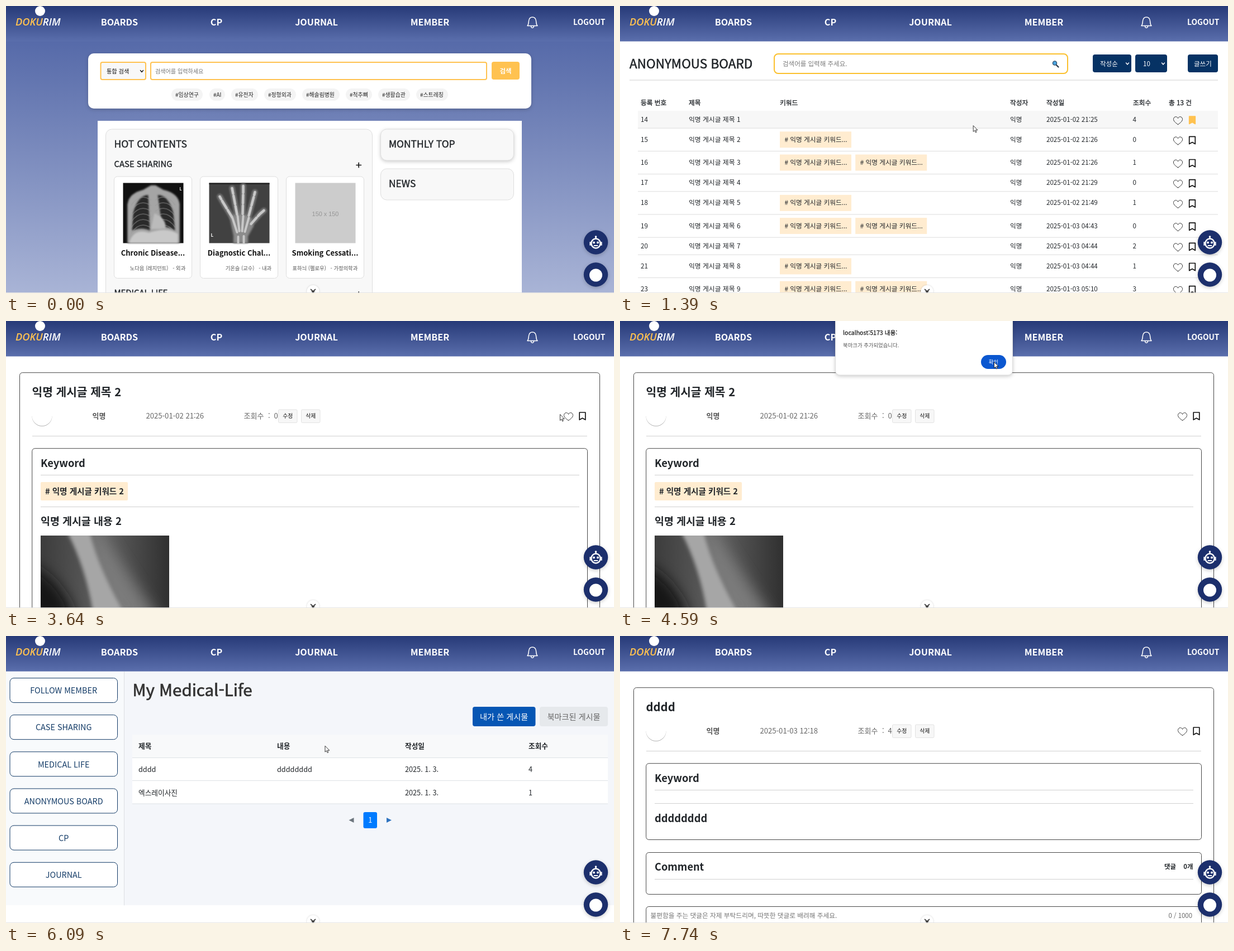
An HTML page for the animation above (8000 ms loop, 1088 by 515 pixels).

```html
<!DOCTYPE html>
<html lang="ko">
<head>
<meta charset="utf-8">
<title>Medical board walkthrough</title>
<style>
html, body { margin: 0; width: 100%; height: 100%; overflow: hidden; background: #fff; }
svg { display: block; width: 1088px; height: 515px; }
text { font-family: "Noto Sans CJK KR", "Noto Sans CJK JP", "Noto Sans CJK", "Noto Sans", sans-serif; fill: currentColor; white-space: pre; }
.m { stroke: currentColor; stroke-width: .025em; }
.b { font-weight: 700; }
.c { text-anchor: middle; }
.e { text-anchor: end; }
.soft { filter: drop-shadow(0 2px 3px rgba(0,0,0,.2)); }
</style>
</head>
<body>
<svg id="stage" viewBox="0 0 1088 515" xmlns="http://www.w3.org/2000/svg"></svg>
<script>
const LOOP = 8000, INK = '#212529', GOLD = '#ffc250', NAVY = '#1c2f6c', CREAM = '#ffecd0';

const text = (x, y, s, size, color = INK, cls = '') =>
  `<text x="${x}" y="${y}" font-size="${size}" class="${cls}" style="color:${color}">${s}</text>`;
// Box given by its left, top, right and bottom edges
const box = (l, t, r, b, fill, line = 'none', radius = 0, more = '') =>
  `<rect x="${l}" y="${t}" width="${r - l}" height="${b - t}" rx="${radius}" fill="${fill}" stroke="${line}" ${more}/>`;
const rule = (l, r, y, color = '#d0d0d0') => `<path d="M${l} ${y}H${r}" stroke="${color}"/>`;
const path = (d, line, width = 1.4, fill = 'none', more = '') =>
  `<path d="${d}" stroke="${line}" stroke-width="${width}" fill="${fill}" stroke-linejoin="round" stroke-linecap="round" ${more}/>`;
const disc = (x, y, r, fill, more = '') => `<circle cx="${x}" cy="${y}" r="${r}" fill="${fill}" ${more}/>`;
const group = (id, body) => `<g id="${id}">${body}</g>`;
const chevron = (x, y, color) => path(`M${x - 2.5} ${y - 1.5}l2.5 3 2.5 -3`, color, 1.4);
const gradient = (id, ...stops) => `<linearGradient id="${id}" x2="0" y2="1">` +
  stops.map(([at, color]) => `<stop offset="${at}" stop-color="${color}"/>`).join('') + '</linearGradient>';

const heart = (x, y) =>
  path(`M${x} ${y + 7}C${x - 6} ${y + 3} ${x - 8.3} ${y} ${x - 8} ${y - 3}C${x - 7} ${y - 8} ${x - 1.5} ${y - 8} ${x} ${y - 4}C${x + 1.5} ${y - 8} ${x + 7} ${y - 8} ${x + 8} ${y - 3}C${x + 8.3} ${y} ${x + 6} ${y + 3} ${x} ${y + 7}Z`, '#333', 1);
const bookmark = (x, y, on) =>
  path(`M${x - 5.3} ${y - 6.5}h10.6v13.3l-5.3 -3 -5.3 3z`, on ? GOLD : '#111', 1.7, on ? GOLD : 'none');

const NAV = [['BOARDS', 203], ['CP', 376.5], ['JOURNAL', 555.5], ['MEMBER', 758.5]];

function header() {
  return box(0, 0, 1088, 63.5, 'url(#bar)') +
    disc(61, 9, 9, '#fff') +
    `<text x="17" y="34.5" font-size="18.3" font-weight="600" font-style="italic" style="font-family:'Open Sans','Noto Sans',sans-serif;color:#fff"><tspan fill="${GOLD}">DOKU</tspan>RIM</text>` +
    NAV.map(([s, x]) => text(x, 34.5, s, 16.2, '#fff', 'b c nav')).join('') +
    path('M933 35.5c2.5-2.5 2-6 2.5-9 .6-4 3-6.5 6.5-6.5s5.9 2.5 6.5 6.5c.5 3 0 6.5 2.5 9zM939.5 36.5c.5 3.5 4.5 3.5 5 0', '#fff', 1.5) +
    text(1072.5, 33.5, 'LOGOUT', 13.8, '#fff', 'b e');
}

function home() {
  const tags = [['임상연구', 296, 352], ['AI', 364, 392], ['유전자', 403, 451], ['정형외과', 462, 519],
    ['해솔림병원', 530, 597], ['척추뼈', 608, 655], ['생활습관', 666, 723], ['스트레칭', 734, 791]];
  const cards = [
    [193.5, 'Chronic Disease...', '노다음 (레지던트)   - 외과', chestScan()],
    [347.5, 'Diagnostic Chal...', '기온슬 (교수)   - 내과', handScan()],
    [501.5, 'Smoking Cessati...', '표하늬 (펠로우)   - 가정의학과',
      box(16, 11.5, 124, 119.5, '#ccc') + `<text x="70" y="70.5" font-size="10.9" class="c" style="font-family:'Liberation Sans',Arial,sans-serif;color:#969696">150 x 150</text>`]];
  return box(0, 63, 1088, 515, 'url(#sky)') +
    box(147, 85, 940, 184, '#fff', 'none', 10, 'class="soft"') +
    box(169.5, 101, 250, 132, '#f8f8f8', GOLD, 3, 'stroke-width="2"') +
    text(180, 120.5, '통합 검색', 10.2, '#111') + chevron(243, 117, '#111') +
    box(259, 101, 860, 132, '#fff', GOLD, 3, 'stroke-width="2"') +
    text(267, 120.5, '검색어를 입력하세요', 10.1, '#757575') +
    box(869, 100, 919, 132, GOLD, 'none', 4) + text(894, 121, '검색', 11.4, '#fff', 'b c') +
    tags.map(([s, l, r]) => box(l, 148, r, 170, '#f4f4f4', 'none', 11) + text(l + 7, 162.8, '#' + s, 9.9, '#222')).join('') +
    box(164, 206, 923, 515, '#fff') +
    box(178.5, 221, 655.5, 560, '#f8f8f8', '#dedede', 11) +
    box(670.5, 221, 908.5, 277, '#f8f8f8', '#dedede', 11, 'class="soft"') +
    box(670.5, 292, 908.5, 348, '#f8f8f8', '#dedede', 11) +
    text(193.5, 253.5, 'HOT CONTENTS', 17.5, INK, 'm') + text(685, 253.5, 'MONTHLY TOP', 17.4, INK, 'm') +
    text(685, 324.5, 'NEWS', 17.4, INK, 'm') +
    text(193.5, 288.5, 'CASE SHARING', 14.9, INK, 'm') + text(193.5, 519.5, 'MEDICAL LIFE', 14.9, INK, 'm') +
    path('M627 285.5h8.5M631.2 281.2v8.5M631.2 513v8', '#111', 1.6) +
    cards.map(([x, title, by, art]) => `<g transform="translate(${x} 306)">` +
      box(0, 0, 139, 182.5, '#fff', '#dedede', 6) + art +
      text(69.5, 141.5, title, 13, '#111', 'b c') + text(127.7, 168, by, 9.3, '#555', 'e') + '</g>').join('');
}

function chestScan() {
  let ribs = '';
  for (let i = 0; i < 6; i++) {
    const y = 42 + i * 10;
    ribs += path(`M66 ${y}Q46 ${y - 13} 31 ${y + 9}M74 ${y}Q94 ${y - 13} 109 ${y + 9}`, '#999', 1.8, 'none', 'opacity=".45"');
  }
  return box(16, 11.5, 124, 119.5, '#111') +
    path('M24 119V50Q26 30 52 24L66 16H74L88 24Q115 30 117 50V119Z', '#777', 1, '#a5a5a5', 'filter="url(#blur)"') +
    path('M61 33Q43 33 34 65L32 97Q50 90 64 97ZM78 33Q97 33 106 65L109 97Q94 88 86 92Z', 'none', 0, '#2c2c2c', 'filter="url(#blur)"') +
    ribs + path('M70 18V110', '#ddd', 7, 'none', 'opacity=".6" filter="url(#blurBone)"') +
    path('M72 66Q94 75 92 94H66Z', 'none', 0, '#bbb', 'filter="url(#blur)"') +
    path('M27 119Q35 92 62 101Q94 90 114 103V119Z', 'none', 0, '#c9c9c9', 'filter="url(#blur)"') +
    text(117, 25, 'L', 7, '#fff', 'b');
}

function handScan() {
  const fingers = 'M57 73L40 45 35 36M66 68L59 31 57 21M76 67L77 27 77 17M87 70L96 36 98 28M91 85L107 67 114 61';
  return box(16, 11.5, 124, 119.5, '#414141') + box(16, 11.5, 124, 14, '#222') +
    path(fingers, '#777', 10, 'none', 'filter="url(#blur)"') +
    path('M53 72Q74 62 91 74L95 89L85 107V119H60V106Z', '#777', 2, '#8c8c8c', 'filter="url(#blur)"') +
    path(fingers, '#c8c8c8', 4.5, 'none', 'stroke-dasharray="15 4"') +
    path('M58 75L66 100M67 71L70 98M77 71L75 98M87 74L80 99M68 108V119M78 107V119', '#c8c8c8', 4) +
    text(19, 108, 'L', 8, '#fff', 'b');
}

const KEYWORDS = [0, 1, 2, 0, 1, 2, 0, 1, 2];
const ROW_TOPS = KEYWORDS.reduce((tops, n) => [...tops, tops.at(-1) + (n ? 41.2 : 31.2)], [188]);

function board() {
  const ids = [14, 15, 16, 17, 18, 19, 20, 21, 23], views = [4, 0, 1, 0, 1, 0, 2, 1, 3];
  const dates = ['02 21:25', '02 21:26', '02 21:26', '02 21:29', '02 21:49', '03 04:43', '03 04:44', '03 04:44', '03 05:10'];
  const heads = [['등록 번호', 37], ['제목', 123], ['키워드', 286], ['작성자', 698], ['작성일', 763], ['조회수', 918], ['총 13 건', 982]];
  const rows = ids.map((id, i) => {
    const top = ROW_TOPS[i], end = ROW_TOPS[i + 1], mid = (top + end) / 2, y = mid + 4;
    let chips = '';
    for (let k = 0; k < KEYWORDS[i]; k++) {
      const l = 286 + k * 135.2;
      chips += box(l, mid - 14.5, l + 128, mid + 14.5, CREAM) + text(l + 8.5, y, '# 익명 게시글 키워드...', 11.7);
    }
    return box(32, top, 1070, end, '#f7f7f7', 'none', 0, 'class="row"') + rule(32, 1070, end, '#dcdcdc') +
      text(37, y, id, 11.6) + text(123, y, `익명 게시글 제목 ${i + 1}`, 11.8) + chips +
      text(698, y, '익명', 11.6) + text(763, y, '2025-01-' + dates[i], 11.6) + text(917.5, y, views[i], 11.6) +
      heart(998.5, mid + 2) + bookmark(1024, mid + 1, i === 0);
  }).join('');
  return box(0, 63, 1088, 515, '#fff') +
    text(17, 112, 'ANONYMOUS BOARD', 22.5, INK, 'm') +
    box(276, 86, 801, 121, '#fff', '#fbc02d', 7, 'stroke-width="2"') +
    text(291, 107.5, '검색어를 입력해 주세요.', 11.5, '#7b7b7b') +
    path('M781 106l3.5 3.5', '#2b3a4a', 2.4) + disc(778, 102.5, 3.6, '#4aa3df', 'stroke="#34506b" stroke-width="1.3"') +
    [[846, 915, '작성순', 859], [922, 979, '10', 936], [1016, 1070, '글쓰기', 1027]].map(([l, r, s, x], i) =>
      box(l, 87, r, 119, '#063264', 'none', 4) + text(x, 107.5, s, 11.5, '#fff') + (i < 2 ? chevron(r - 7, 103.5, '#fff') : '')).join('') +
    rule(17, 1070, 133) + heads.map(([s, x]) => text(x, 178, s, 11.7, INK, 'm')).join('') + rows;
}

const frame = (l, t, r, b) => box(l, t, r, b, 'none', '#333', 5, 'stroke-width=".9"');

// Shared top part of a post page
const post = (title, date, views) =>
  box(0, 63, 1088, 515, '#fff') + frame(24.5, 92.7, 1062.5, 560) +
  text(46.5, 135, title, 20.3, INK, 'b') +
  path('M46.5 170A18 18 0 0 0 82.5 170', 'none', 0, '#fff', 'style="filter:drop-shadow(0 1px .7px rgba(0,0,0,.3))"') +
  text(154.5, 175, '익명', 13, '#555', 'b') + text(250.5, 175, date, 13.1, '#666') +
  text(425.5, 175, '조회수', 13, '#666') + text(469, 175, ':', 13, '#666') + text(479.5, 175, views, 13, '#666') +
  [[487.5, '수정'], [528.5, '삭제']].map(([l, s]) =>
    box(l, 159, l + 33.5, 182.5, '#f7f7f7', '#e2e2e2', 2) + text(l + 16.8, 174, s, 9.9, '#111', 'c')).join('') +
  heart(1006.5, 171.5) + bookmark(1031.5, 170.5, false) + rule(47, 1040, 206.5) +
  text(62, 262, 'Keyword', 18.3, INK, 'b') + rule(62, 1026, 276.5);
const panel = (t, b) => frame(46.7, t, 1040.5, b);

function boneScan() {
  return '<svg x="62" y="385" width="230" height="130" viewBox="0 0 230 130">' + box(0, 0, 230, 130, 'url(#film)') +
    path('M-30 150V50Q35 70 62 150Z', 'none', 0, '#161616', 'filter="url(#blurWide)"') +
    path('M95 -25Q150 60 215 155H130Q95 60 75 -25Z', 'none', 0, '#7a7a7a', 'filter="url(#blurWide)"') +
    path('M48 -5Q82 60 94 140H150Q104 60 88 -5Z', 'none', 0, '#a6a6a6', 'filter="url(#blurBone)"') + '</svg>';
}

const detail = () => post('익명 게시글 제목 2', '2025-01-02 21:26', 0) + panel(228.7, 560) +
  group('marked', bookmark(1031.5, 170.5, true)) +
  box(62, 289, 218, 322, CREAM, 'none', 2) + text(70, 311, '# 익명 게시글 키워드 2', 14.6, INK, 'b') +
  rule(62, 1026, 333.5) + text(62, 366, '익명 게시글 내용 2', 18.4, INK, 'b') + boneScan();

const ownPost = () => post('dddd', '2025-01-03 12:18', 4) + panel(228.7, 365.5) + rule(62, 1026, 300.5) +
  text(62, 333.5, 'dddddddd', 18.3, INK, 'b') +
  panel(388.5, 463.5) + text(62, 421, 'Comment', 18.2, INK, 'b') + rule(62, 1026, 436.5) +
  text(974, 418, '댓글', 11.4, INK, 'b') + text(1025.5, 418, '0개', 11.4, INK, 'b e') +
  panel(485.5, 560) + text(54.5, 506, '불편함을 주는 댓글은 자제 부탁드리며, 따뜻한 댓글로 배려해 주세요.', 11.7, '#757575') +
  text(1024, 505.5, '0 / 1000', 11.4, '#666', 'e');

const SIDE = ['FOLLOW MEMBER', 'CASE SHARING', 'MEDICAL LIFE', 'ANONYMOUS BOARD', 'CP', 'JOURNAL'];
const sideTop = i => 75.5 + i * 66.15;

function myPage() {
  const columns = [237, 485, 714, 935];
  const line = (cells, y, cls = '') => cells.map((s, i) => text(columns[i], y, s, 12.7, INK, cls)).join('');
  return box(0, 63.5, 1088, 515, '#fff') + box(0, 63.5, 1088, 483, '#f4f6fa') +
    box(0, 63.5, 211, 483, '#f8fafc') + path('M211.5 64V483', '#dcdfe3', 1) +
    SIDE.map((s, i) => box(7, sideTop(i), 199.5, sideTop(i) + 44, '#fff', '#123a66', 7, 'class="side"') +
      text(103.2, sideTop(i) + 27.7, s, 14.4, '#123a66', 'c sideText')).join('') +
    text(226.5, 108, 'My Medical-Life', 29.5, '#333', 'm') +
    box(835, 127, 947.5, 162, '#0656b4', 'none', 4) + text(891.2, 150, '내가 쓴 게시물', 14.2, '#fff', 'c') +
    box(955, 127, 1077, 162, '#e6e9ec', 'none', 4) + text(1016, 150, '북마크된 게시물', 14.1, '#666', 'c') +
    box(226, 177, 1077, 218, '#f8f9fa') + box(226, 218, 1077, 301, '#fff') +
    [218.5, 259.5, 301].map(y => rule(226, 1077, y, '#dee2e6')).join('') +
    line(['제목', '내용', '작성일', '조회수'], 202, 'b') +
    line(['dddd', 'dddddddd', '2025. 1. 3.', 4], 244) + line(['엑스레이사진', '', '2025. 1. 3.', 1], 285.5) +
    path('M622.5 326v9l-9 -4.5z', 'none', 0, '#6c757d') + path('M681 326v9l9 -4.5z', 'none', 0, '#2f74c0') +
    box(639.5, 316, 664, 345, '#007bff', 'none', 3) + text(651.8, 335, '1', 12.7, '#fff', 'c') +
    group('status', box(-3, 502, 167, 515, '#2b2b2b', 'none', 2) +
      `<text x="0" y="512.5" font-size="8.6" style="font-family:'Noto Sans',sans-serif;color:#ddd">ocalhost:5173/myPage/anonymousboard</text>`);
}

const menu = (id, l, items) => group(id, box(l, 40, l + 129, 179.5, '#fff', '#ddd', 3, 'class="soft"') +
  items.map((s, i) => box(l, 40 + i * 46.5, l + 129, 86.5 + i * 46.5, GOLD, 'none', 1, 'class="fill"') +
    text(l + 64.5, 67.7 + i * 46.4, s, 11.55, '#111', 'c')).join(''));

const notice = () => group('notice', box(385.5, -10, 702.5, 97, '#fff', '#ddd', 8, 'class="soft"') +
  text(399, 25, 'localhost:5173 내용:', 10.6, '#222', 'm') + text(399, 47, '북마크가 추가되었습니다.', 9.4, '#555') +
  box(646, 61, 691, 86, '#0b57d0', 'none', 12.5) + text(668.5, 77, '확인', 9.4, '#fff', 'c'));

function floaters() {
  return [424, 482].map(y => disc(1055.5, y, 21.7, NAVY, 'class="soft"')).join('') +
    path('M1055.5 417v-3M1045.5 424v5M1065.5 424v5', '#fff', 2.2) + disc(1055.5, 414, 1.8, '#fff') +
    box(1047.5, 417.5, 1063.5, 434.5, NAVY, '#fff', 8, 'stroke-width="2.4"') +
    disc(1052, 424.5, 2, '#fff') + disc(1059, 424.5, 2, '#fff') + path('M1052.5 430h6', '#fff', 2) +
    disc(1055.5, 483, 11.5, '#fff') +
    disc(549.5, 512, 11, '#fff', 'style="filter:drop-shadow(0 0 1.5px rgba(0,0,0,.18))"') +
    path('M545.5 508.5l4 3.5 4 -3.5M547.5 512l2 2.5 2 -2.5', '#444', 1.7) +
    box(0, 514, 1088, 515, '#e4e4e4');
}

const pointer = () => group('cursor',
  disc(0, 2, 9.5, '#f7e322', 'id="click" opacity=".8"') +
  group('arrow', path('M.5 0v10.5l2.5 -2.3 1.7 3.8 1.7 -.8 -1.7 -3.6h3.2z', '#222', .9, '#fff')) +
  group('hand', path('M-.2 .5c0 -1.5 2.2 -1.5 2.2 0v4.5l4 .8c1 .2 1.5 .8 1.4 1.8l-.6 3.6 -.8 2.3h-5l-3.6 -5c-.7 -1.2 .7 -2 1.5 -1.2l.9 .9z', '#222', .9, '#fff')));

const SCENES = [['home', 0, home], ['board', 1080, board], ['detail', 2560, detail], ['myPage', 5850, myPage], ['ownPost', 7470, ownPost]];
const MENUS = [
  { id: 'boards', nav: 0, left: 138.5, from: 330, to: 1080, items: ['CASE SHARING', 'MEDICAL LIFE', 'ANONYMOUS BOARD'], hover: [[430, 590], [590, 710], [710, 1200]] },
  { id: 'member', nav: 3, left: 694, from: 4900, to: 5850, items: ['전체 회원 조회', '내 정보 수정', '마이페이지'], hover: [[4960, 5060], [5060, 5210], [5340, 6000]] }];
// time, x, y
const PATH = [[70, 998, 440], [330, 205, 29], [400, 205, 30], [810, 218, 150], [1100, 218, 150], [1670, 1020, 276], [1740, 1020, 276],
  [2210, 166, 244], [2880, 166, 244], [3640, 991, 168], [3710, 991, 168], [3920, 1030, 170], [4140, 1030, 170], [4500, 669, 74],
  [4720, 669, 74], [4920, 758, 30], [5270, 755, 152], [5870, 755, 152], [6490, 120, 309], [6820, 120, 309], [7320, 253, 243], [7700, 253, 243]];
const CLICKS = [[990, 1080], [2440, 2600], [4000, 4110], [4670, 4760], [5740, 5850], [6740, 6820], [7380, 7480]];
const HANDS = [[300, 1080], [1500, 2600], [3860, 4100], [4870, 5850], [6380, 6860], [7150, 7500]];

const blur = (id, size) => `<filter id="${id}" x="-50%" y="-50%" width="200%" height="200%"><feGaussianBlur stdDeviation="${size}"/></filter>`;
const stage = document.getElementById('stage');
stage.innerHTML = '<defs>' + gradient('bar', [0, '#273a78'], [1, '#5a6eac']) + gradient('sky', [0, '#566aa9'], [1, '#a9b4d6']) +
  '<linearGradient id="film"><stop stop-color="#3c3c3c"/><stop offset=".5" stop-color="#606060"/><stop offset="1" stop-color="#303030"/></linearGradient>' +
  blur('blur', 1.6) + blur('blurBone', 3) + blur('blurWide', 13) + '</defs>' +
  SCENES.map(([id, , draw]) => group(id, draw())).join('') + header() +
  MENUS.map(m => menu(m.id, m.left, m.items)).join('') + notice() + floaters() + pointer();

const el = id => document.getElementById(id);
const all = selector => [...stage.querySelectorAll(selector)];
const show = (id, on) => { el(id).style.display = on ? '' : 'none'; };
const within = (t, [from, to]) => t >= from && t < to;
const clamp = v => Math.max(0, Math.min(1, v));
const navs = all('.nav'), rows = all('.row'), sides = all('.side'), sideTexts = all('.sideText');
const menuParts = MENUS.map(m => ({ fills: all(`#${m.id} .fill`), labels: all(`#${m.id} text`) }));

function cursorAt(t) {
  const i = PATH.findIndex(p => p[0] > t);
  if (i < 1) return (i ? PATH.at(-1) : PATH[0]).slice(1);
  const [t0, x0, y0] = PATH[i - 1], [t1, x1, y1] = PATH[i];
  const p = (t - t0) / (t1 - t0), k = p * p * (3 - 2 * p);
  return [x0 + (x1 - x0) * k, y0 + (y1 - y0) * k];
}

function render(t) {
  const [x, y] = cursorAt(t);
  SCENES.forEach(([id, from], i) => show(id, t >= from && t < (SCENES[i + 1]?.[1] ?? LOOP)));
  navs.forEach(n => { n.style.color = '#fff'; });
  MENUS.forEach((m, k) => {
    const open = within(t, [m.from, m.to]);
    show(m.id, open);
    if (open) navs[m.nav].style.color = GOLD;
    m.hover.forEach(([on, off], i) => {
      menuParts[k].fills[i].style.opacity = Math.min(clamp((t - on) / 140), clamp(1 - (t - off) / 170));
      menuParts[k].labels[i].style.fontWeight = within(t, [on, off]) ? 700 : 400;
    });
  });
  rows.forEach((r, i) => { r.style.opacity = +(y >= ROW_TOPS[i] && y < ROW_TOPS[i + 1]); });
  sides.forEach((s, i) => {
    const over = x > 7 && x < 199 && y > sideTop(i) && y < sideTop(i) + 44;
    s.style.fill = over ? '#0f3660' : '#fff';
    s.style.stroke = over ? '#e8bd4a' : '#123a66';
    sideTexts[i].style.color = over ? '#fff' : '#123a66';
  });
  show('status', within(t, [6420, 6900]));
  show('notice', within(t, [4110, 4760]));
  show('marked', t >= 4760);
  const hand = HANDS.some(span => within(t, span));
  show('cursor', within(t, [70, 7700]));
  show('hand', hand);
  show('arrow', !hand);
  show('click', CLICKS.some(span => within(t, span)));
  el('cursor').setAttribute('transform', `translate(${x.toFixed(2)} ${y.toFixed(2)})`);
}

const start = performance.now();
(function tick() {
  render((performance.now() - start) % LOOP);
  requestAnimationFrame(tick);
})();
</script>
</body>
</html>
```
